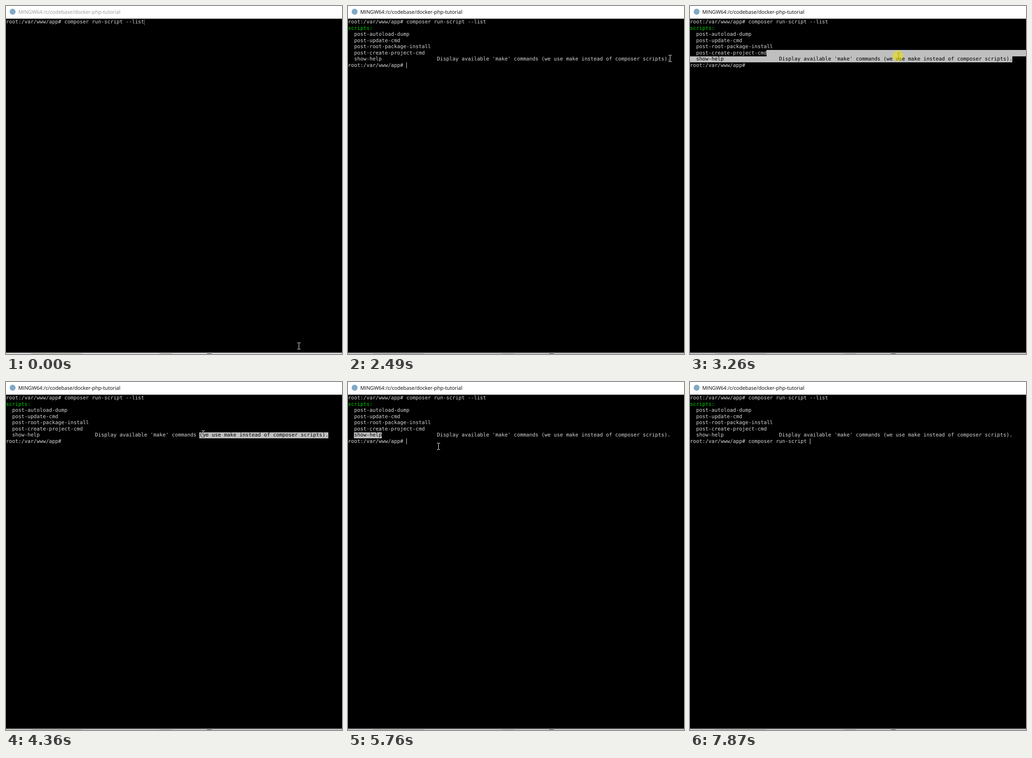
Animation of 737 by 760 pixels, one loop 8000 ms. Source, as an HTML page with a canvas:

```html
<!DOCTYPE html>
<html lang="en">
<head>
<meta charset="utf-8">
<title>Terminal</title>
<style>
html, body { margin: 0; width: 737px; height: 760px; overflow: hidden; background: #000; }
canvas { display: block; }
</style>
</head>
<body>
<canvas id="stage" width="737" height="760"></canvas>
<script>
const ctx = document.getElementById('stage').getContext('2d');
const W = 737, H = 760, LOOP = 8000, TICK = 78, PHASE = 62;
const CELL = 6.737, ROW = 13.5, TOP = 28.5;
const FG = '#d6d6d6', GREEN = '#00d400', SELECTED = '#bfbfbf';
const MONO = '11.19px "DejaVu Sans Mono", monospace';
const UI = '11.15px "Open Sans", sans-serif';

const PROMPT = 'root:/var/www/app# ';
const COMMAND = 'composer run-script --list';
const OUTPUT = [
  'scripts:',
  '  post-autoload-dump',
  '  post-update-cmd',
  '  post-root-package-install',
  '  post-create-project-cmd',
  '  show-help'.padEnd(29) + "Display available 'make' commands (we use make instead of composer scripts).",
];
const HELP = OUTPUT[5];
const WORD_AT = HELP.indexOf('show-help'), WORD_END = WORD_AT + 'show-help'.length;

// Moments of the session, in ms
const FOCUS = 220, ENTER = 1000, PRINT = 1290, WAKE = 1610, HIDE = 6470, RECALL = 6540;
const ERASE = { start: 7030, every: 150, count: '--list'.length };
const FOCUS_CLICK = [290, 360], DRAG = [2640, 3810], CLICK = [5140, 5210];
const DOUBLE_CLICK = [5290, 5380], CLEAR_CLICK = [5840, 5990];
const PRESSES = [FOCUS_CLICK, DRAG, CLICK, DOUBLE_CLICK, CLEAR_CLICK];

// Pointer moves; bow bends the path downwards
const HOME = { x: 642, y: 742 };
const MOVES = [
  { start: 0, end: 218, x: 497, y: 319.5, ease: 1, bow: 0 },
  { start: 1232, end: 2480, x: 706, y: 114.5, ease: 1, bow: 0 },
  { start: 2636, end: 3530, x: 432.5, y: 113, ease: 2, bow: -13 },
  { start: 4352, end: 5132, x: 53, y: 120.5, ease: 1, bow: 30 },
  { start: 5444, end: 5600, x: 198, y: 140.5, ease: 1, bow: 0 },
  { start: 5756, end: 6068, x: 198, y: 135.5, ease: 1, bow: 0 },
];

const within = (t, [from, to]) => t >= from && t < to;
const rowY = row => Math.round(TOP + row * ROW);

function rect(color, x, y, w, h) {
  ctx.fillStyle = color;
  ctx.fillRect(x, y, w, h);
}

function disc(color, x, y, r) {
  ctx.fillStyle = color;
  ctx.beginPath();
  ctx.arc(x, y, r, 0, 2 * Math.PI);
  ctx.fill();
}

function text(str, x, y, color, font) {
  ctx.font = font;
  ctx.fillStyle = color;
  ctx.fillText(str, x, y);
}

function line(str, row, color = FG) {
  text(str, 0, Math.floor(TOP + row * ROW + 10), color, MONO);
}

function pointerAt(t) {
  const time = Math.max(0, Math.floor((t - PHASE) / TICK) * TICK + PHASE);
  let { x, y } = HOME;
  for (const move of MOVES) {
    if (time < move.start) break;
    const k = Math.min(1, (time - move.start) / (move.end - move.start));
    const e = 1 - (1 - k) ** move.ease;
    x += (move.x - x) * e;
    y += (move.y - y) * e + move.bow * Math.sin(Math.PI * e);
  }
  return { x, y };
}

function drawTitle(focused) {
  rect('#fff', 0, 0, W, 27.7);
  disc('#7fa9c6', 14.5, 12.5, 6.5);
  text('MINGW64:/c/codebase/docker-php-tutorial', 27, 17, focused ? '#000' : '#999', UI);
}

// Sliver of the window behind
function drawBottomEdge(focused) {
  rect(focused ? '#b8b8b8' : '#d2d0d0', 0, 757, W, 3);
  rect('#8c8884', 55, 759, 112, 1);
  rect('#8c8884', 336, 759, 29, 1);
  rect('#222', 441, 759, 10, 1);
}

function highlight(row, from, to) {
  const x = Math.round(from * CELL), w = Math.min(W, Math.round(to * CELL)) - x;
  const y = rowY(row), h = rowY(row + 1) - y;
  rect(SELECTED, x, y, w, h);
  ctx.save();
  ctx.beginPath();
  ctx.rect(x, y, w, h);
  ctx.clip();
  line(OUTPUT[row - 1], row, '#000');
  ctx.restore();
}

function drawSelection(t) {
  if (within(t, [DOUBLE_CLICK[0], CLEAR_CLICK[0]])) highlight(6, WORD_AT, WORD_END);
  if (!within(t, [DRAG[0], CLICK[0]])) return;
  const { x, y } = pointerAt(Math.min(t, DRAG[1]));
  const col = Math.floor((x - 3) / CELL);
  if (y < rowY(6)) {
    highlight(5, Math.min(col, OUTPUT[4].length), Infinity);
    highlight(6, 0, HELP.length);
  } else if (col < HELP.length - 1) {
    highlight(6, col, HELP.length);
  }
}

function erasedAt(t) {
  const n = Math.floor((t - ERASE.start) / ERASE.every) + 1;
  return Math.max(0, Math.min(ERASE.count, n));
}

// Every key press and every print restarts the blinking
function drawCaret(t, row, col) {
  const erased = erasedAt(t);
  const reset = erased
    ? ERASE.start + (erased - 1) * ERASE.every
    : [0, FOCUS + 80, ENTER, PRINT, RECALL].findLast(r => r <= t);
  if ((t - reset) % 1060 >= 530) return;
  rect(t < FOCUS ? '#777' : FG, Math.round(col * CELL), rowY(row), 1, 13);
}

function drawPointer(t) {
  const p = pointerAt(t), x = Math.floor(p.x), y = Math.floor(p.y);
  if (t < ENTER || within(t, [WAKE, HIDE])) {
    ctx.globalCompositeOperation = 'difference';
    rect('#fff', x, y - 6, 1, 13);
    for (const end of [y - 7, y + 7]) {
      rect('#fff', x - 3, end, 3, 1);
      rect('#fff', x + 1, end, 3, 1);
    }
    ctx.globalCompositeOperation = 'source-over';
  }
  if (PRESSES.some(press => within(t, press))) {
    disc('rgba(240,226,0,.57)', p.x - 1.5, p.y - 0.5, 11.5);
  }
}

function draw(t) {
  const focused = t >= FOCUS;
  rect('#000', 0, 0, W, H);
  drawTitle(focused);
  drawBottomEdge(focused);
  line(PROMPT + COMMAND, 0);

  if (t < ENTER) {
    drawCaret(t, 0, (PROMPT + COMMAND).length);
  } else if (t < PRINT) {
    drawCaret(t, 1, 0);
  } else {
    OUTPUT.forEach((str, i) => line(str, i + 1, i ? FG : GREEN));
    drawSelection(t);
    const typed = t < RECALL ? '' : COMMAND.slice(0, COMMAND.length - erasedAt(t));
    line(PROMPT + typed, 7);
    drawCaret(t, 7, (PROMPT + typed).length);
  }
  drawPointer(t);
}

ctx.textRendering = 'geometricPrecision';
function frame() {
  draw(performance.now() % LOOP);
  requestAnimationFrame(frame);
}
frame();
</script>
</body>
</html>
```
